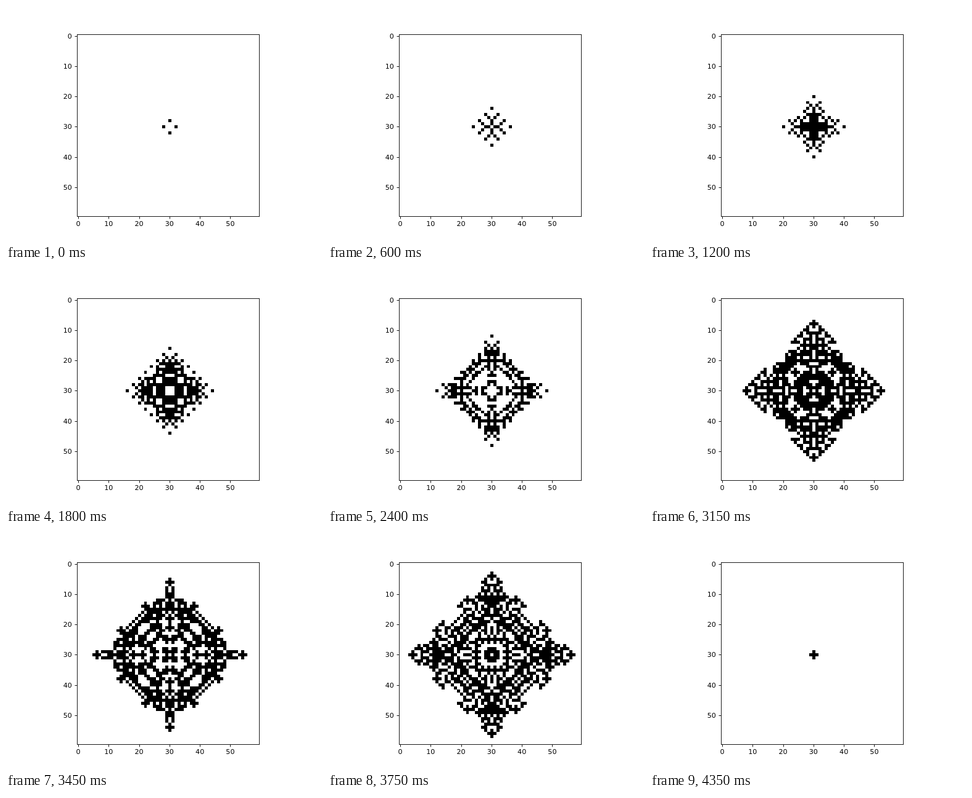
Recreate the animation shown at these times as an HTML page with a canvas. Size 512 by 384 pixels, loop 4.5 s.

```html
<!DOCTYPE html>
<html lang="en">
<head>
<meta charset="utf-8">
<title>Cellular automaton</title>
<style>
  html, body { margin: 0; width: 100%; height: 100%; overflow: hidden; background: #fff; }
  canvas { display: block; }
</style>
</head>
<body>
<canvas id="stage" width="512" height="384"></canvas>
<script>
const SIZE = 60, STEPS = 30, STEP_MS = 150, FIRST_STEP = 2;
const LEFT = 115, TOP = 46, SIDE = 296;
const ctx = document.getElementById('stage').getContext('2d');

const wrap = i => (i + SIZE) % SIZE;
const cellAt = (grid, x, y) => grid[wrap(y) * SIZE + wrap(x)];

// A cell lives when it and its four neighbours sum to 1, 3 or 4.
function evolve(grid) {
  return grid.map((self, i) => {
    const x = i % SIZE, y = Math.floor(i / SIZE);
    const sum = self + cellAt(grid, x - 1, y) + cellAt(grid, x + 1, y)
      + cellAt(grid, x, y - 1) + cellAt(grid, x, y + 1);
    return sum === 1 || sum === 3 || sum === 4 ? 1 : 0;
  });
}

const seed = new Uint8Array(SIZE * SIZE);
seed[30 * SIZE + 30] = 1;
const generations = [seed];
while (generations.length < STEPS) generations.push(evolve(generations.at(-1)));

const edge = i => Math.round(i * SIDE / SIZE);

function drawCells(grid) {
  ctx.fillStyle = '#000';
  grid.forEach((alive, i) => {
    if (!alive) return;
    const x = i % SIZE, y = Math.floor(i / SIZE);
    ctx.fillRect(LEFT + edge(x), TOP + edge(y), edge(x + 1) - edge(x), edge(y + 1) - edge(y));
  });
}

function drawAxes() {
  const right = 410, bottom = 342;
  ctx.fillStyle = '#1c1c1c';
  ctx.fillRect(LEFT, TOP, right - LEFT + 1, 1);
  ctx.fillRect(LEFT, bottom, right - LEFT + 1, 1);
  ctx.fillRect(LEFT, TOP + 1, 1, bottom - TOP - 1);
  ctx.fillRect(right, TOP + 1, 1, bottom - TOP - 1);

  ctx.font = '11.11px "DejaVu Sans", sans-serif';
  for (let value = 0; value < SIZE; value += 10) {
    const offset = (value + 0.5) * 4.928;
    const x = Math.round(114.56 + offset), y = Math.round(46.08 + offset);
    ctx.fillStyle = '#1c1c1c';
    ctx.fillRect(x, bottom + 1, 1, 3.5);
    ctx.fillRect(LEFT - 3.5, y, 3.5, 1);
    ctx.fillStyle = '#000';
    ctx.textAlign = 'center';
    ctx.fillText(value, 114.56 + offset, 358);
    ctx.textAlign = 'right';
    ctx.fillText(value, 106.8, y + 4);
  }
}

function render() {
  const step = Math.floor(performance.now() / STEP_MS) + FIRST_STEP;
  ctx.fillStyle = '#fff';
  ctx.fillRect(0, 0, 512, 384);
  drawCells(generations[step % STEPS]);
  drawAxes();
  requestAnimationFrame(render);
}
render();
</script>
</body>
</html>
```
